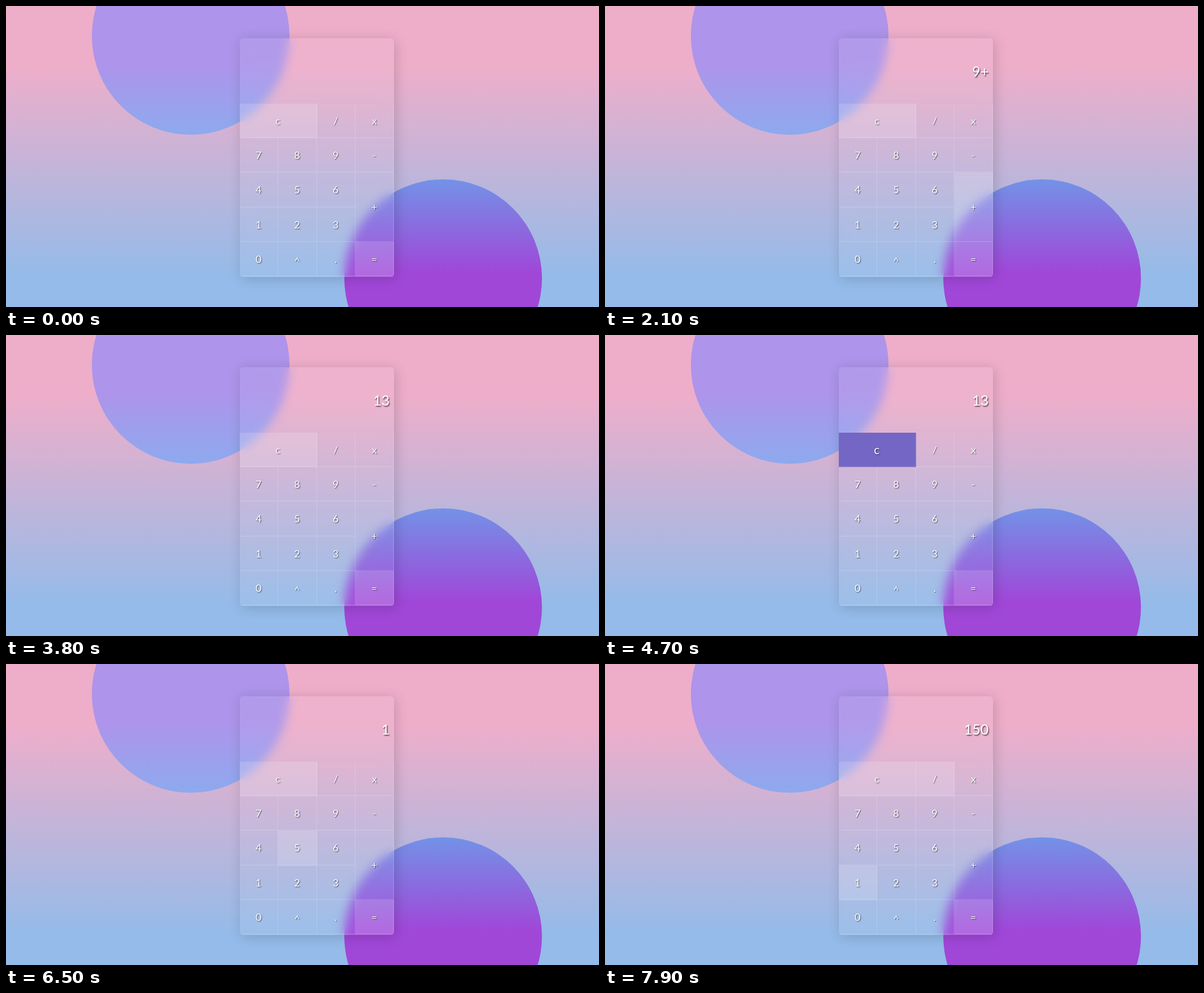
Write an HTML page that moves like this. It is 1050 px wide and 533 px high and loops after 8000 ms.

```html
<!DOCTYPE html>
<html lang="en">
<head>
<meta charset="utf-8">
<title>Glass calculator</title>
<style>
  * { box-sizing: border-box; }
  html, body { margin: 0; width: 100%; height: 100%; overflow: hidden; }
  body {
    position: relative;
    background: linear-gradient(#eeaeca 20%, #94bbe9 90%);
    font-family: Lato, "Open Sans", sans-serif;
    color: #fff;
  }
  .ball { position: absolute; width: 350px; height: 350px; border-radius: 50%; }
  .top { left: 152px; top: -122px; background: linear-gradient(#ae94ea 64%, #8fa8ee 98%); }
  .low { left: 599px; top: 307px; background: linear-gradient(#7392e7, #a047d8 47%); }
  #panel {
    position: absolute; left: 414px; top: 57px; width: 273.3px; height: 422.5px;
    display: grid;
    grid-template: 115.5px repeat(5, 61.4px) / repeat(4, 1fr);
    border-radius: 6px; overflow: hidden;
    background: rgba(255, 255, 255, .06);
    backdrop-filter: blur(9px);
    box-shadow: 3px 3px 22px rgba(0, 0, 0, .17);
  }
  #screen {
    grid-column: span 4;
    display: flex; align-items: center; justify-content: flex-end;
    padding-right: 8px;
    font-size: 25px;
    text-shadow: 1.5px 1.5px 2px rgba(0, 0, 0, .6);
  }
  .key {
    display: flex; align-items: center; justify-content: center;
    padding: 0 2px 1px 0;
    font-size: 18px;
    text-shadow: 1px 1px 1.5px rgba(0, 0, 0, .6);
    box-shadow: inset -1.4px -1.4px rgba(255, 255, 255, .14);
  }
  .lit { background: rgba(255, 255, 255, .14); }
  .down { background: #7466c4; font-size: 21px; }
  .wide { grid-column: span 2; }
  .tall { grid-row: span 2; }
  .caret { padding-top: 6px; }
</style>
</head>
<body>
<div class="ball top"></div>
<div class="ball low"></div>
<div id="panel"><div id="screen"></div></div>
<script>
  const LOOP = 8000;
  const panel = document.getElementById('panel');
  const screen_ = document.getElementById('screen');
  const extra = { c: 'wide', '+': 'tall', '^': 'caret' };

  const keys = [...'c/x789-456+1230^.='].map(label => {
    const el = document.createElement('div');
    el.textContent = label;
    panel.append(el);
    return { label, el };
  });

  // Start time and the keys under the pointer
  const hovers = [
    [0, ''], [800, '9'], [1400, ''], [1600, '+'], [2300, '6'], [2400, '5'],
    [2500, '4'], [3100, '1'], [3200, '2'], [3300, '3'], [3400, ''],
    [4300, '3'], [4400, ''], [5400, '5'], [5600, '4'], [5700, '1'],
    [6200, ''], [6400, '5'], [7100, '2'], [7200, '0'], [7800, '1'], [7900, '1/']
  ];
  // Each press is held for 200 ms
  const presses = [
    [1200, '9'], [1900, '+'], [2700, '4'], [3600, '='],
    [4700, 'c'], [5900, '1'], [6700, '5'], [7500, '0']
  ];
  const readings = [
    [0, ''], [1400, '9'], [2100, '9+'], [2900, '9+4'], [3800, '13'],
    [4900, ''], [6100, '1'], [6900, '15'], [7700, '150']
  ];

  const at = (list, t) => list.filter(([start]) => start <= t).pop()[1];

  function draw(t) {
    const hover = at(hovers, t);
    const press = presses.find(([start]) => t >= start && t < start + 200);
    for (const { label, el } of keys) {
      const lit = 'c='.includes(label) || hover.includes(label);
      const state = press && press[1] === label ? 'down' : lit ? 'lit' : '';
      el.className = `key ${extra[label] || ''} ${state}`;
    }
    screen_.textContent = at(readings, t);
  }

  const begin = performance.now();
  function tick() {
    draw((performance.now() - begin) % LOOP);
    requestAnimationFrame(tick);
  }
  tick();
</script>
</body>
</html>
```
